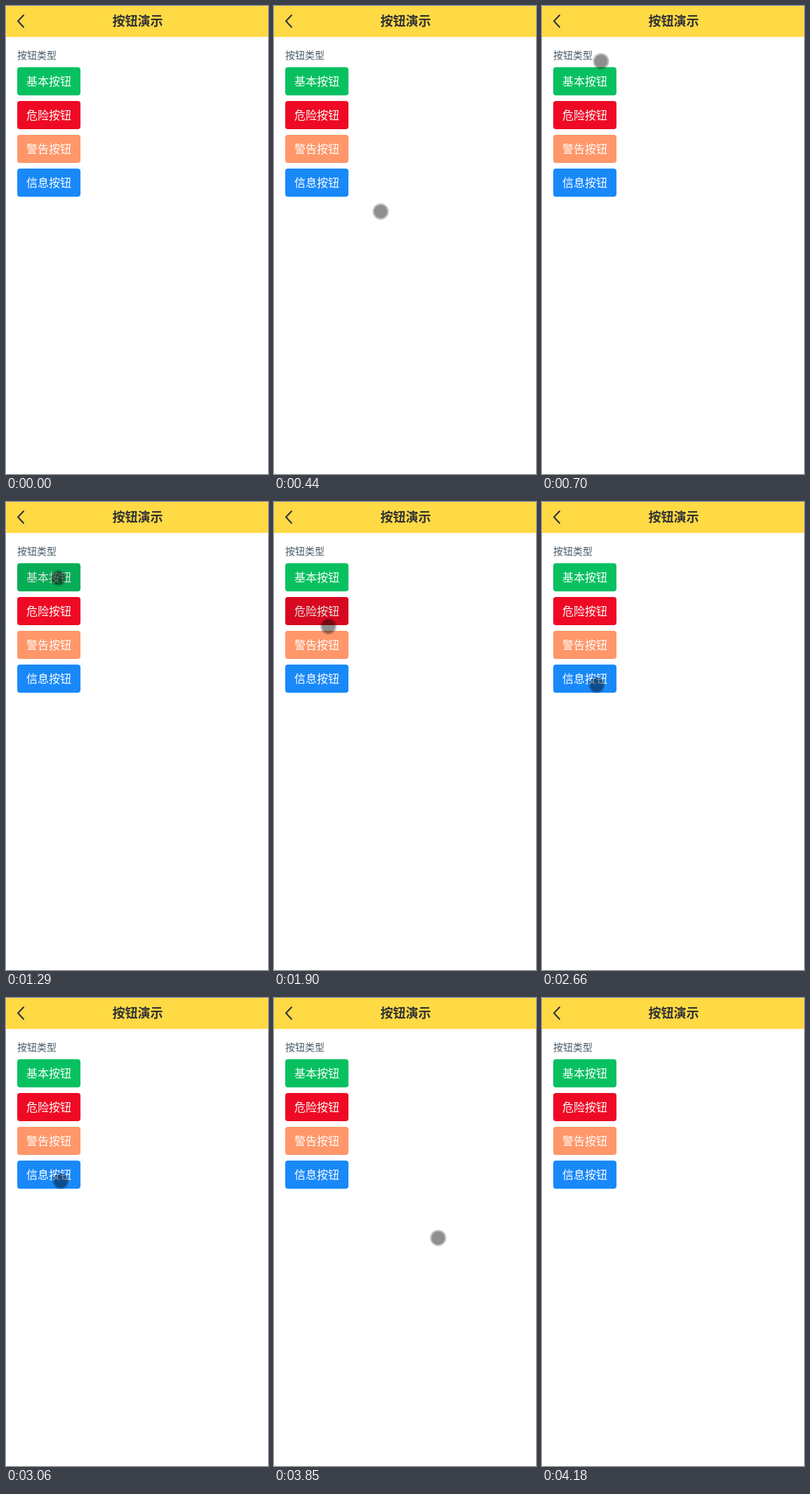
Recreate the animation shown at these times as an HTML page. Size 373x665 px, loop 4.77 s.

```html
<!DOCTYPE html>
<html lang="zh-CN">
<head>
<meta charset="utf-8">
<title>按钮演示</title>
<style>
html, body { margin: 0; width: 100%; height: 100%; overflow: hidden; background: #fff; }
body { position: relative; font-family: "Noto Sans CJK SC", "Noto Sans CJK", sans-serif; }
header { height: 44px; padding-left: 2px; background: #ffda44; color: #323233; font-size: 18px; font-weight: bold; line-height: 41px; text-align: center; }
header svg { position: absolute; left: 0; top: 0; }
h2 { position: absolute; left: 16px; top: 59px; margin: 0; font-size: 14px; line-height: 20px; font-weight: 400; color: #455a64; }
.btn { position: absolute; left: 16px; width: 90px; height: 40px; border-radius: 4px; overflow: hidden; color: #fff; font-size: 16px; font-weight: 500; line-height: 39px; text-align: center; }
.btn.active::after { content: ""; position: absolute; inset: 0; background: rgba(0, 0, 0, .1); }
#dot { position: absolute; left: -11.5px; top: -11.5px; width: 19px; height: 19px; border: 2px solid rgba(0, 0, 0, .25); border-radius: 50%; background: rgba(0, 0, 0, .44); background-clip: padding-box; }
#dot.down { border-color: rgba(0, 0, 0, .16); background-color: rgba(0, 0, 0, .5); }
</style>
</head>
<body>
<header>
  <svg width="44" height="44"><path d="M25.500 12.500l-8.500 9 8.500 9" fill="none" stroke="#323233" stroke-width="2"/></svg>
  按钮演示
</header>
<h2>按钮类型</h2>
<div id="dot"></div>
<script>
const LOOP = 4770;
const buttons = [
  { text: "基本按钮", color: "#07c160", down: 1090, clear: 1390 },
  { text: "危险按钮", color: "#ee0a24", down: 1640, clear: 1940 },
  { text: "警告按钮", color: "#ff976a", down: 2150, clear: 2450 },
  { text: "信息按钮", color: "#1989fa", down: 2830, clear: 3060 }
];
// Places where the pointer rests between moves
const stops = [
  { arrive: 350, leave: 350, x: 251, y: 605 },
  { arrive: 700, leave: 840, x: 83.5, y: 78 },
  { arrive: 1090, leave: 1300, x: 74, y: 107.5 },
  { arrive: 1640, leave: 1850, x: 77, y: 156 },
  { arrive: 2150, leave: 2430, x: 77, y: 203 },
  { arrive: 2660, leave: 3550, x: 77.5, y: 259.5 }
];

const dot = document.getElementById("dot");
buttons.forEach((b, i) => {
  b.el = document.createElement("div");
  b.el.className = "btn";
  b.el.textContent = b.text;
  b.el.style.cssText = `top:${87 + 48 * i}px;background:${b.color}`;
  dot.before(b.el);
});

const within = (t, from, to) => t >= from && t < to;
const easeOut = k => 1 - (1 - k) ** 3;

function pointer(t) {
  if (t >= 4140) return [369.5, 662.5];
  const i = Math.max(0, stops.findLastIndex(s => s.leave <= t));
  const a = stops[i], b = stops[i + 1];
  if (!b) {
    // Curved exit through the lower right edge
    const k = (t - a.leave) / 460;
    return [a.x + 288 * k ** 1.45, a.y + 328 * k ** 3.3];
  }
  const k = easeOut(Math.min(1, Math.max(0, (t - a.leave) / (b.arrive - a.leave))));
  return [a.x + (b.x - a.x) * k, a.y + (b.y - a.y) * k];
}

function draw(t) {
  const [x, y] = pointer(t);
  dot.style.transform = `translate(${x}px, ${y}px)`;
  dot.style.visibility = within(t, 350, 4040) || within(t, 4140, 4180) ? "visible" : "hidden";
  dot.classList.toggle("down", buttons.some(b => within(t, b.down, b.clear - 60)));
  for (const b of buttons) b.el.classList.toggle("active", within(t, b.down + 90, b.clear));
}

const start = performance.now();
function tick() {
  draw((performance.now() - start) % LOOP);
  requestAnimationFrame(tick);
}
tick();
</script>
</body>
</html>
```
